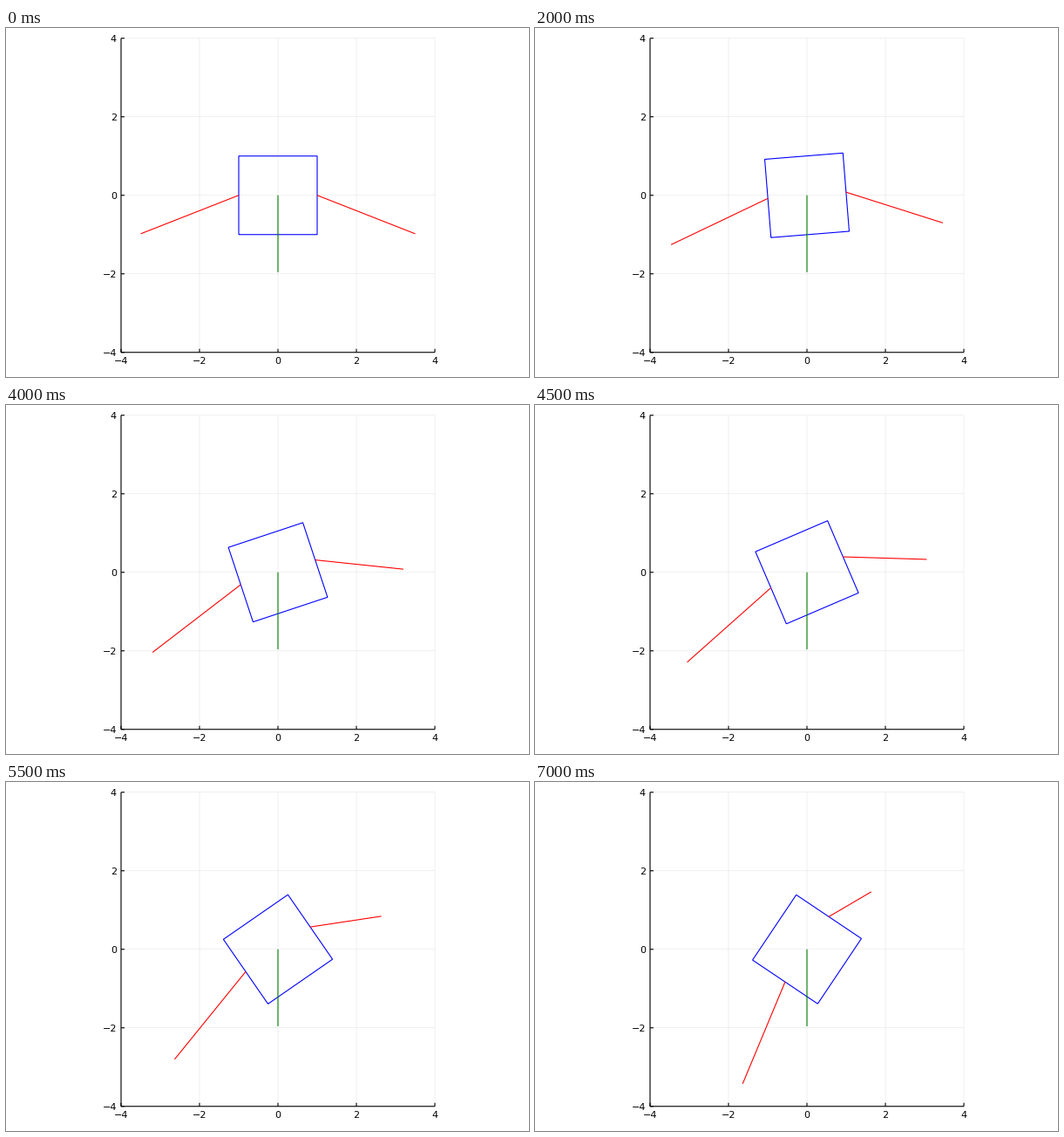
A matplotlib script that plays this animation: 600 px wide and 400 px high, repeating every 7.5 s.

```python
import matplotlib.pyplot as plt
import numpy as np
from matplotlib.animation import FuncAnimation

DPI = 100
PX = 72 / DPI  # one pixel in points
FRAMES, STEP_MS = 15, 500
GRAVITY = 0.98
TICKS = range(-4, 5, 2)

plt.rcParams.update({"font.family": "DejaVu Sans", "font.size": 8,
                     "path.snap": False, "lines.solid_capstyle": "butt",
                     "lines.solid_joinstyle": "miter"})

fig = plt.figure(figsize=(6, 4), dpi=DPI, facecolor="white")
ax = fig.add_axes([132 / 600, 28.25 / 400, 360 / 600, 360 / 400])
ax.set(xlim=(-4, 4), ylim=(-4, 4))
ax.axis("off")


def line(xs, ys, color, width=1.1, **kw):
    return ax.plot(xs, ys, color=color, lw=width * PX, clip_on=False, **kw)[0]


def draw_axes():
    tick = 4 / 45
    for v in TICKS:
        for xs, ys in (((v, v), (-4, 4)), ((-4, 4), (v, v))):
            line(xs, ys, "black", 0.6, alpha=0.1, zorder=1)
        line((v, v), (-4, -4 + tick), "black")
        line((-4, -4 + tick), (v, v), "black")
        label = str(v).replace("-", "\u2212")
        ax.annotate(label, (v, -4), xytext=(0, -13.6 * PX),
                    textcoords="offset points", ha="center", va="baseline")
        ax.annotate(label, (-4, v), xytext=(-5 * PX, -4.2 * PX),
                    textcoords="offset points", ha="right", va="baseline")
    line((-4, 4), (-4, -4), "black")
    line((-4, -4), (-4, 4), "black")


draw_axes()
box = line([], [], "blue")
arms = [line([], [], "red") for _ in range(2)]
line((0, 0), (0, -2 * GRAVITY), "green")

CORNERS = np.array([[-1, 1, 1, -1, -1], [-1, -1, 1, 1, -1]])


def update(i):
    t = i / 10
    angle = t * t / 2  # constant angular acceleration
    pull = 2.5 - 0.102 * t**2 - 0.13 * t**3
    c, s = np.cos(angle), np.sin(angle)
    box.set_data(np.array([[c, -s], [s, c]]) @ CORNERS)
    for arm, side in zip(arms, (-1, 1)):
        start = side * np.array([c, s])
        end = start * (1 + pull) - [0, GRAVITY]
        arm.set_data(*zip(start, end))
    return [box, *arms]


anim = FuncAnimation(fig, update, frames=FRAMES, interval=STEP_MS,
                     repeat=True, repeat_delay=0)
plt.show()
```
